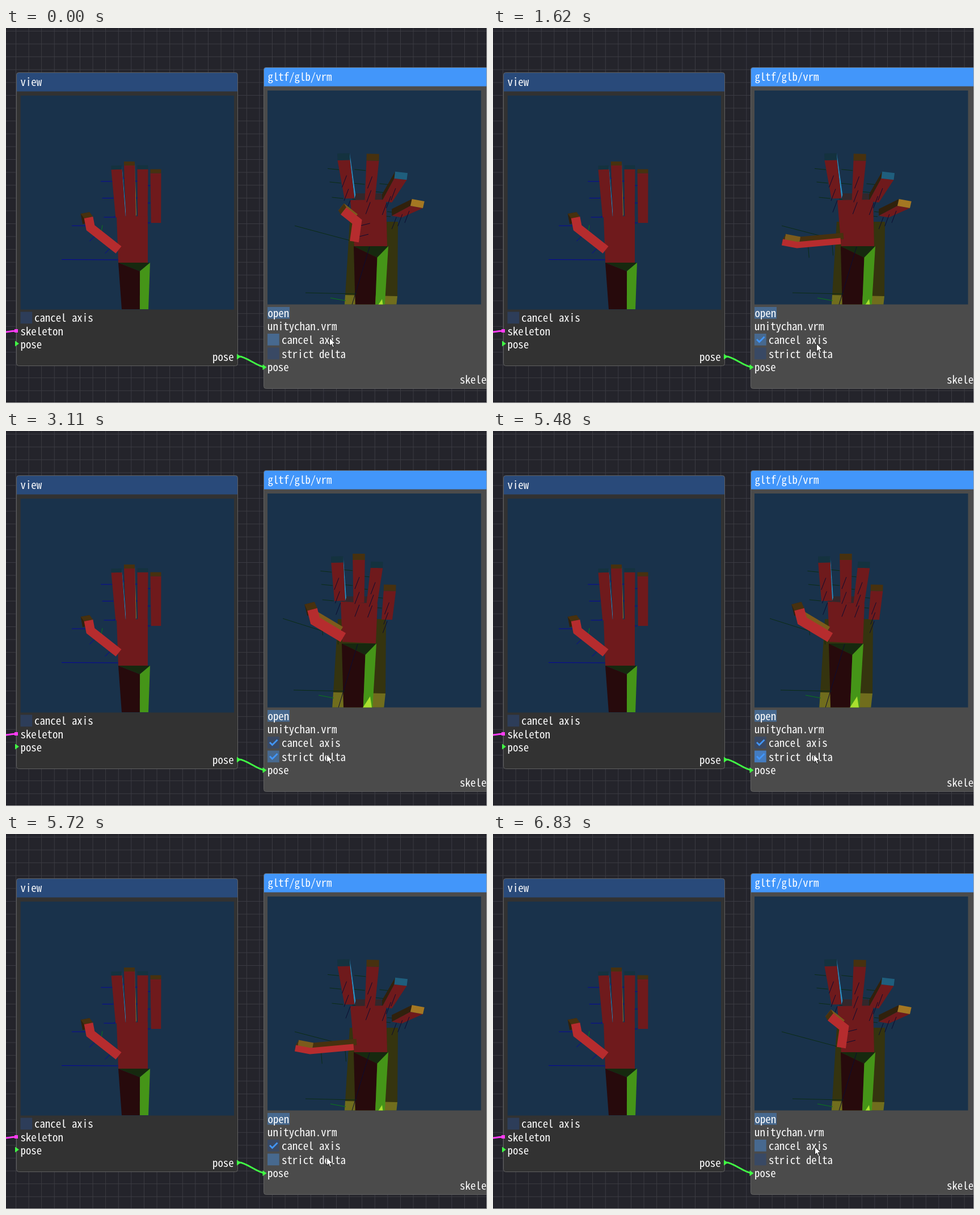
An HTML page with a canvas for the animation above (8 s loop, 848x660 px).

```html
<!DOCTYPE html>
<html lang="en">
<head>
<meta charset="utf-8">
<title>Pose nodes</title>
<style>
html, body { margin: 0; width: 100%; height: 100%; overflow: hidden; background: #24242b; }
canvas { display: block; }
</style>
</head>
<body>
<canvas id="stage" width="848" height="660"></canvas>
<script>
const ctx = document.getElementById('stage').getContext('2d');
const LOOP = 8000, CHAR = 9.42, GRID = 22.6;
const FONT = '"Noto Sans Mono CJK JP", "Noto Sans Mono", "DejaVu Sans Mono", monospace';

const RED = '#6f1a1c', BRIGHT = '#b62c2e', MAROON = '#270a0c';
const GREEN = '#459518', MOSS = '#16290f', LIME = '#a9e02f';
const TEAL = '#14323f', STEEL = '#1f5e7d', CYAN = '#2b90c4';
const BROWN = '#47310f', DARK = '#30210c', GOLD = '#a47722', AMBER = '#7c5b1c';
const OLIVE = '#35340f', STRAW = '#706d1d';
const BLUE = '#06069c', NAVY = '#0c0c30', FOREST = '#0b2c14', LEAF = '#0b7a18';
const LINK = '#41f945', PINK = '#ff3cf5', ACCENT = '#4296fa';
const boxColors = { idle: '#394964', hover: '#47698f', press: '#447cc0' };

// Fingers from index to little: cap colour, tip, base.
const viewHand = {
  width: 19, taper: .92, cap: 7, comb: BLUE,
  palm: [[195, 332], [250, 331], [250, 413], [198, 413]],
  fingers: [
    [TEAL, [195, 249], [202, 333], CYAN], [BROWN, [217.5, 242], [220, 332], GOLD],
    [TEAL, [241, 248.5], [241, 333]], [BROWN, [264, 255.5], [264.5, 343]],
  ],
};
const openHand = {
  width: 22, taper: .8, cap: 12, comb: FOREST, arm: [0, 0], web: 616,
  palm: [[607, 303], [670, 302], [672, 384], [614, 384]],
  fingers: [
    [TEAL, [595.5, 232.5], [605.5, 300], CYAN], [BROWN, [646.5, 233.5], [641.5, 303]],
    [STEEL, [695.5, 266], [671.5, 306]], [GOLD, [724, 315], [689, 332]],
  ],
};
const strictHand = {
  width: 21.5, taper: .88, cap: 11, comb: FOREST, arm: [-21, -10], web: 597,
  palm: [[590, 300], [655, 304], [652, 374], [593, 371]],
  fingers: [
    [TEAL, [584, 231.5], [588.5, 299], CYAN], [BROWN, [622, 227], [622, 302]],
    [TEAL, [653.5, 241], [645, 304]], [BROWN, [676.5, 281.5], [671.5, 332]],
  ],
};

// joints: tip, knuckle, base; lift: offset of the far edge; spine: short axis lines.
const viewThumb = {
  joints: [[145.5, 333.5], [149, 351.5], [198.5, 390.5]], width: 16,
  lift: [-6, -8], spine: [-14, 14], cap: BROWN, side: DARK, line: BLUE,
};
const foldedThumb = {
  joints: [[595, 322], [619, 341], [614, 376]], width: 16,
  lift: [-4, -7], spine: [24, -6], cap: BROWN, side: AMBER, line: NAVY, axis: [509, 348],
};
const wideThumb = {
  joints: [[510, 377], [536, 382], [613, 375]], width: 11,
  lift: [5, -9], spine: [2, 24], cap: BROWN, side: AMBER, line: FOREST, axis: [509, 348], top: BROWN,
};
const strictThumb = {
  joints: [[540, 314], [545, 334], [594.5, 363.5]], width: 18,
  lift: [-5, -11], spine: [1, 18], cap: BROWN, side: DARK, line: FOREST, axis: [488, 330], top: AMBER,
};
const poses = {
  folded: [openHand, foldedThumb],
  wide: [openHand, wideThumb],
  strict: [strictHand, strictThumb],
};

// From a time on: values that change then.
const steps = [
  [0, { pose: 'folded', x: 570, y: 545, cancel: 'hover', strict: 'idle', axisOn: 0, deltaOn: 0 }],
  [750, { cancel: 'press' }],
  [870, { cancel: 'hover', axisOn: 1, pose: 'wide' }],
  [1620, { y: 555 }],
  [1740, { x: 568, y: 565, cancel: 'idle', strict: 'hover' }],
  [1990, { x: 565, y: 569 }],
  [2990, { strict: 'press' }],
  [3110, { strict: 'hover', deltaOn: 1, pose: 'strict' }],
  [5480, { strict: 'press' }],
  [5600, { strict: 'hover', deltaOn: 0 }],
  [5720, { pose: 'wide' }],
  [6090, { x: 566, y: 558, strict: 'idle', cancel: 'hover' }],
  [6210, { x: 567, y: 550 }],
  [6710, { axisOn: 0 }],
  [6830, { pose: 'folded' }],
];

ctx.font = '100px ' + FONT;
const fontSize = CHAR * 100 / ctx.measureText('0').width;

const add = (p, q) => [p[0] + q[0], p[1] + q[1]];
const mix = (p, q, k) => [p[0] + (q[0] - p[0]) * k, p[1] + (q[1] - p[1]) * k];

function rect(color, x, y, w, h) {
  ctx.fillStyle = color;
  ctx.fillRect(x, y, w, h);
}

function text(s, x, y) {
  ctx.font = fontSize + 'px ' + FONT;
  ctx.fillStyle = '#fff';
  ctx.fillText(s, x, y);
}

function trace(points, closed) {
  ctx.beginPath();
  for (const p of points) ctx.lineTo(...p);
  if (closed) ctx.closePath();
}

function poly(color, ...points) {
  trace(points, true);
  ctx.fillStyle = color;
  ctx.fill();
}

function line(color, points, width = 1) {
  trace(points);
  ctx.strokeStyle = color;
  ctx.lineWidth = width;
  ctx.stroke();
}

function finger(hand, [tint, tip, base, edge]) {
  const { width, taper, cap } = hand;
  const lean = (tip[0] - base[0]) / Math.hypot(tip[0] - base[0], tip[1] - base[1]);
  const half = [width / 2, width * lean * .1];
  const foot = half.map(v => v * taper);
  const back = half.map(v => -v);
  const left = add(tip, back), right = add(tip, half);
  const baseLeft = add(base, foot.map(v => -v)), baseRight = add(base, foot);
  const rise = [3 * lean, -cap];
  if (lean > .4) poly(DARK, add(left, rise), add(baseLeft, [0, -cap]), baseLeft, left);
  if (edge) poly(edge, add(right, rise), add(baseRight, [cap / 6, -cap / 2]), baseRight, right);
  poly(RED, left, right, baseRight, baseLeft);
  poly(tint, add(left, rise), add(right, rise), right, left);
}

function combs({ fingers, width, comb }) {
  for (const [, tip, base] of fingers)
    for (const k of [.25, .6, 1]) {
      const p = add(mix(tip, base, k), [-width / 2, 0]);
      line(comb, [p, add(p, [-20, comb === BLUE ? 0 : -2])]);
    }
}

function thumb({ joints, width, lift, spine, cap, side, line: color, axis, top }) {
  const [tip, knuckle, base] = joints;
  const far = joints.map(p => add(p, lift));
  if (axis) line(FOREST, [axis, base]);
  for (const k of [.25, .8]) {
    const p = mix(knuckle, base, k);
    line(color, [p, add(p, spine)]);
  }
  if (top) line(top, far.slice(1), width);
  line(side, far.slice(0, 2), width);
  const d = Math.hypot(knuckle[0] - tip[0], knuckle[1] - tip[1]) * 2 / width;
  const n = [(knuckle[1] - tip[1]) / d, (tip[0] - knuckle[0]) / d];
  const m = n.map(v => -v);
  poly(cap, add(far[0], n), add(far[0], m), add(tip, m), add(tip, n));
  line(BRIGHT, joints, width);
}

function arm(x, y, w, drop, foot, bottom) {
  const peak = [x + w * .68, y + drop], corner = [x + w, y];
  const inner = [foot + w * .57, bottom], outer = [foot + w * .84, bottom];
  poly(MAROON, [x, y], peak, inner, [foot, bottom]);
  poly(MOSS, [x, y], corner, peak);
  poly(GREEN, corner, outer, inner, peak);
}

function modelArm(offset) {
  ctx.save();
  ctx.translate(...offset);
  poly(OLIVE, [606, 341], [691, 341], [690, 473], [598, 471]);
  poly(STRAW, [598, 470], [690, 472], [687, 500], [596, 500]);
  arm(613, 384, 61, 20, 616, 497);
  poly(LIME, [663, 477], [666, 497], [650, 497]);
  line(FOREST, [[528, 466], [618, 468]]);
  line(LEAF, [[572, 475], [599, 480]]);
  line(NAVY, [[641, 385], [607, 497]]);
  ctx.restore();
}

function drawHand(hand) {
  combs(hand);
  if (hand.arm) {
    modelArm(hand.arm);
    rect('#33272b', hand.web, 291, 46, 13);
  } else {
    arm(198, 413, 56, 15, 204, 495);
    line(BLUE, [[98, 407.5], [198, 408]]);
    line(BLUE, [[116, 348], [140, 348]]);
    line(LEAF, [[170, 347], [168, 358]]);
  }
  for (const f of hand.fingers) finger(hand, f);
  poly(RED, ...hand.palm);
  if (hand.arm)
    for (const [, tip, base] of hand.fingers)
      for (const k of [.4, .75, 1.05]) {
        const p = add(mix(tip, base, k), [1, 0]);
        line(NAVY, [p, add(p, [-8, 21])]);
      }
}

function view(x, y, [hand, digit]) {
  ctx.save();
  ctx.beginPath();
  ctx.rect(x, y, 376.5, 376.5);
  ctx.clip();
  rect('#19324b', x, y, 377, 377);
  drawHand(hand);
  thumb(digit);
  ctx.restore();
}

function node(x, y, w, h, body, title, name) {
  ctx.save();
  ctx.beginPath();
  ctx.roundRect(x + .5, y + .5, w - 1, h - 1, 4);
  ctx.clip();
  rect(body, x, y, w, h);
  rect(title, x, y, w, 33.6);
  ctx.restore();
  ctx.strokeStyle = '#646464';
  ctx.lineWidth = .94;
  ctx.stroke();
  text(name, x + 7.5, y + 24);
}

function link(color, x1, y1, x2, y2) {
  const bend = Math.hypot(x2 - x1, y2 - y1) / 4;
  ctx.beginPath();
  ctx.moveTo(x1, y1);
  ctx.bezierCurveTo(x1 + bend, y1, x2 - bend, y2, x2, y2);
  ctx.strokeStyle = color;
  ctx.lineWidth = 2.8;
  ctx.stroke();
}

function pin(x, y) {
  poly(LINK, [x, y - 5], [x + 7, y], [x, y + 5]);
}

function checkbox(y, state, on, label) {
  rect(boxColors[state], 461, y, 20.7, 20.7);
  if (on) line(ACCENT, [[465, y + 10], [469.5, y + 14.5], [478.5, y + 5.5]], 2.8);
  text(label, 486, y + 18);
}

function cursor(x, y) {
  ctx.save();
  ctx.translate(x, y);
  trace([[.5, .5], [.5, 14.5], [3.8, 11.5], [6, 17], [8.4, 16], [6.2, 10.7], [10.4, 10.5]], true);
  ctx.fillStyle = '#fff';
  ctx.fill();
  ctx.strokeStyle = '#111';
  ctx.lineWidth = .9;
  ctx.stroke();
  ctx.restore();
}

function draw(t) {
  const s = {};
  for (const [at, change] of steps) if (t >= at) Object.assign(s, change);

  rect('#24242b', 0, 0, 848, 660);
  for (let x = 17; x < 848; x += GRID) rect('#3d3d44', x, 0, .94, 660);
  for (let y = 5; y < 660; y += GRID) rect('#3d3d44', 0, y, 848, .94);

  link(PINK, -30, 539, 18, 533);
  link(LINK, 411, 578, 457, 597);

  node(18, 78, 391, 517, '#323232', '#294a7a', 'view');
  view(25.5, 119, [viewHand, viewThumb]);
  rect('#2d3d59', 25.5, 499.5, 20.7, 20.7);
  text('cancel axis', 50, 517);
  text('skeleton', 25.5, 541);
  text('pose', 25.5, 564);
  text('pose', 364, 586);
  rect(PINK, 15, 530, 6, 6);
  pin(16, 555.5);
  pin(407, 578.5);

  node(454, 69, 420, 566, '#4b4b4b', ACCENT, 'gltf/glb/vrm');
  view(461, 110, poses[s.pose]);
  rect(boxColors.hover, 461, 491, 39, 20.7);
  text('open', 461.5, 509);
  text('unitychan.vrm', 461, 532);
  checkbox(538, s.cancel, s.axisOn, 'cancel axis');
  checkbox(562.5, s.strict, s.deltaOn, 'strict delta');
  text('pose', 461, 604);
  text('skeleton', 800, 626);
  pin(452.5, 597);

  // Pale edge of the window.
  rect('#a8a8a8', 847, 0, 1, 660);
  rect('#a8a8a8', 0, 659, 848, 1);
  cursor(s.x, s.y);
}

function frame() {
  draw(performance.now() % LOOP);
  requestAnimationFrame(frame);
}
frame();
</script>
</body>
</html>
```
